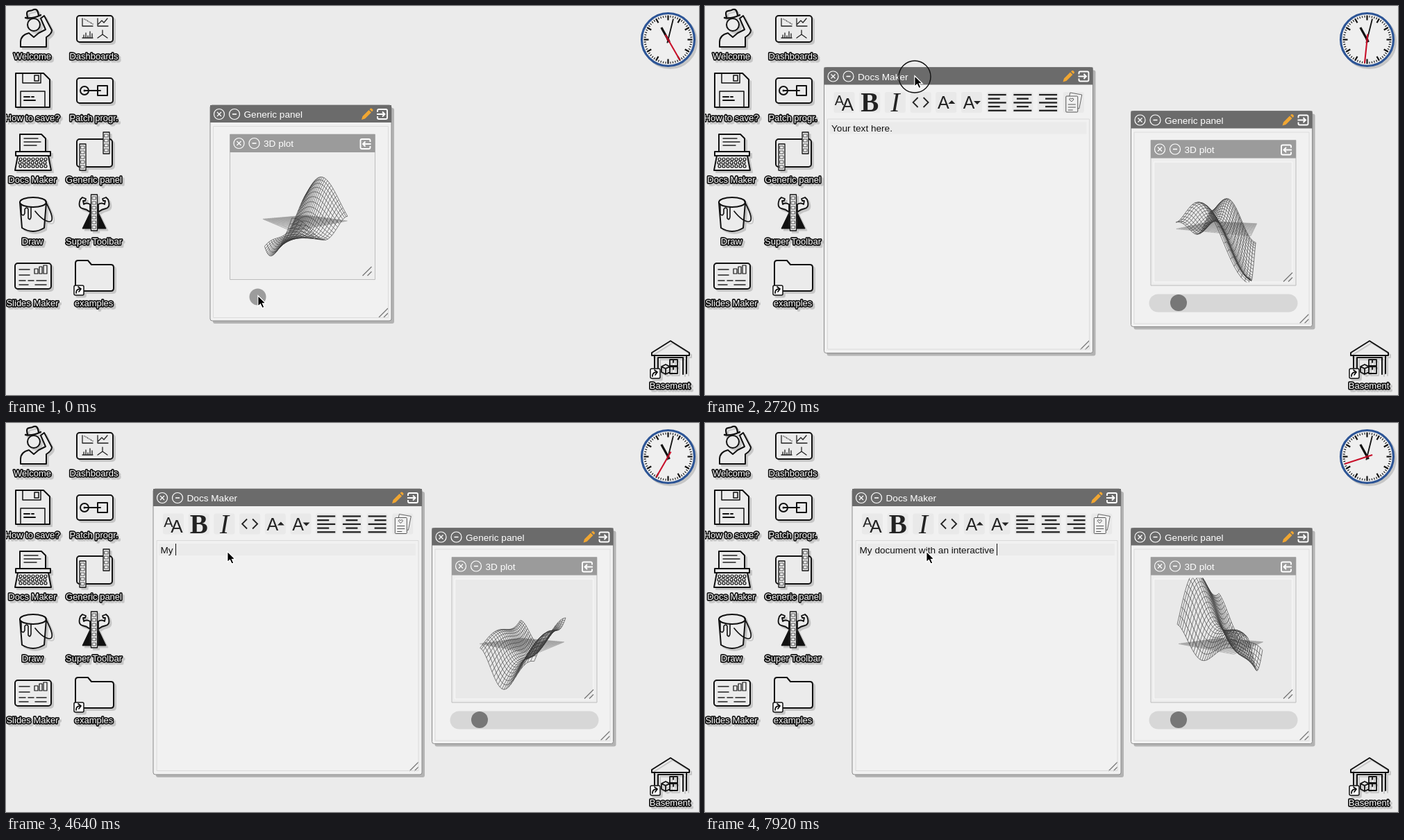
These frames come from a looping animation (998x561 px, 8000 ms). An HTML page with a canvas:

```html
<!DOCTYPE html>
<html>
<head>
<meta charset="utf-8">
<style>
html, body { margin: 0; height: 100%; overflow: hidden; background: #ebebeb; }
canvas { display: block; }
</style>
</head>
<body>
<canvas id="stage" width="998" height="561"></canvas>
<script>
const W = 998, H = 561, LOOP = 8000, STEP = 80;
const SANS = '"Liberation Sans", Arial, sans-serif', SERIF = '"Liberation Serif", Times, serif';
const ctx = document.getElementById('stage').getContext('2d');

// ---------- helpers ----------
function line(c, d, color = '#111', width = 2, fill) {
  const p = new Path2D(d);
  if (fill) { c.fillStyle = fill; c.fill(p); }
  c.strokeStyle = color;
  c.lineWidth = width;
  if (width) c.stroke(p);
}
function box(c, x, y, w, h, r, fill, stroke, width = 1) {
  c.beginPath();
  c.roundRect(x, y, w, h, r);
  if (fill) { c.fillStyle = fill; c.fill(); }
  if (stroke) { c.strokeStyle = stroke; c.lineWidth = width; c.stroke(); }
}
function disc(c, x, y, r, fill, stroke, width = 1) {
  c.beginPath();
  c.arc(x, y, r, 0, 7);
  if (fill) { c.fillStyle = fill; c.fill(); }
  if (stroke) { c.strokeStyle = stroke; c.lineWidth = width; c.stroke(); }
}
function text(c, s, x, y, color = '#111', font = '13.6px ' + SANS, align = 'left') {
  c.font = font;
  c.textAlign = align;
  c.fillStyle = color;
  c.fillText(s, x, y);
}
// Values at time t from rows of [time, ...values]
function track(rows, t, ease = k => k) {
  let i = 0;
  while (i < rows.length - 2 && t >= rows[i + 1][0]) i++;
  const a = rows[i], b = rows[i + 1];
  const k = ease(Math.min(1, Math.max(0, (t - a[0]) / (b[0] - a[0]))));
  return a.slice(1).map((v, j) => v + (b[j + 1] - v) * k);
}
const smooth = k => k * k * (3 - 2 * k);

// ---------- desktop ----------
function label(c, s, x, y) {
  c.font = '13px ' + SANS;
  c.textAlign = 'center';
  c.strokeStyle = '#111';
  c.lineWidth = 3.4;
  c.strokeText(s, x, y);
  c.fillStyle = '#fff';
  c.fillText(s, x, y);
}
function badge(c, x, y) {
  box(c, x, y, 14, 14, 2, '#fff', '#111', 1.5);
  line(c, `M${x + 3} ${y + 11}Q${x + 3} ${y + 5} ${x + 9} ${y + 5}M${x + 6} ${y + 2}L${x + 10} ${y + 5} ${x + 7} ${y + 9}`, '#111', 1.8);
}
function strip(c, x, y, n) {
  box(c, x, y, 9, n * 7 + 3, 0, '#eee', '#111', 1.3);
  for (let i = 0; i < n; i++) box(c, x + 2, y + 3 + i * 7, 5, 4, 0, null, '#555', 1);
}
function drawIcons(c) {
  const bg = '#ebebeb';
  c.lineJoin = c.lineCap = 'round';
  // Welcome
  line(c, 'M21 59V52Q21 42 33 39L40 45 47 39 57 34 50 18 55 14 66 35Q66 40 58 45V59Z', '#111', 2, bg);
  disc(c, 40, 27, 9, bg, '#111', 2);
  line(c, 'M28 17Q38 19 50 13M31 16C28 5 33 8 38 6C44 3 46 6 47 14', '#111', 2.3);
  // Floppy disk
  line(c, 'M14 97H54L63 106V146H14Z', '#111', 2, bg);
  line(c, 'M24 97V111H50V97M41 100H47V108H41ZM21 146V123H56V146', '#111', 1.5);
  line(c, 'M26 131H34M37 131H40M26 136H42', '#111', 2);
  // Typewriter
  line(c, 'M20 210V185H51L57 191V210Z', '#111', 2, bg);
  line(c, 'M26 191H46M26 196H50M26 201H44', '#222', 1.4);
  line(c, 'M14 210H64V216H14ZM17 216L13 237H65L61 216Z', '#111', 2, bg);
  for (let r = 0; r < 3; r++)
    for (let i = 0; i < 7; i++) disc(c, 21 + i * 6 - (r % 2), 221 + r * 5, 2, null, '#111', 1.2);
  // Bucket
  line(c, 'M20 283L23 320Q39 330 55 320L58 283Z', '#111', 2, bg);
  c.beginPath();
  c.ellipse(39, 283, 19, 7, 0, 0, 7);
  c.fill();
  c.stroke();
  line(c, 'M22 286V300Q25 304 27 299V293Q30 289 32 293V306Q35 310 36 304V290', '#111', 1.6);
  line(c, 'M57 282Q72 310 63 311Q54 311 42 296', '#111', 1.7);
  // Slides
  box(c, 13, 371, 52, 37, 4, bg, '#111', 2);
  line(c, 'M19 380H34M19 388H34M19 396H28M32 396H40M44 396H58M19 402H32M42 402H58', '#222', 1.5);
  line(c, 'M41 386V379H46V386ZM48 386V376H52V386ZM54 386V374H59V386Z', '#111', 1.2);
  // Dashboards
  box(c, 102, 14, 52, 38, 4, bg, '#111', 2);
  line(c, 'M110 18V29H125M132 18V29H147M133 26L138 21 141 24 146 18M110 46H125M112 46V42M115 46V39M118 46V43M121 46V37M124 46V40M139 35V41L132 46M139 41L146 46', '#222', 1.3);
  for (let i = 0; i < 8; i++) disc(c, 113 + (i * 5) % 13, 19 + (i * 3) % 8, .7, '#222');
  // Patch
  box(c, 102, 104, 52, 36, 4, bg, '#111', 2);
  disc(c, 113, 122, 6, null, '#111', 2);
  disc(c, 113, 122, 1.5, '#111');
  line(c, 'M113 122H136M132 115H146V129H132Z', '#111', 2);
  // Generic panel
  box(c, 102, 192, 51, 40, 4, bg, '#111', 2);
  strip(c, 140, 182, 4);
  strip(c, 106, 199, 5);
  // Super Toolbar
  line(c, 'M121 298L110 321H122ZM133 298L144 321H132Z', '#111', 1, '#111');
  line(c, 'M121 297Q116 293 110 292Q103 290 107 279L110 276 115 278 114 281H111L112 286Q116 283 121 286Z', '#111', 1.8, bg);
  line(c, 'M133 297Q138 293 144 292Q151 290 147 279L144 276 139 278 140 281H143L142 286Q138 283 133 286Z', '#111', 1.8, bg);
  strip(c, 122.5, 272, 7);
  // Folder
  line(c, 'M100 410V371Q100 367 104 367H118L123 373H151Q155 373 155 377V407Q155 411 151 411H102Z', '#111', 2, bg);
  badge(c, 98, 403);
  // Basement
  line(c, 'M930 500L957 483 984 500V504H930ZM934 504V530M980 504V530M939 531V507H975V531', '#111', 2);
  line(c, 'M956 510H967V519H956ZM956 520H967V530H956ZM944 520L950 517 956 520V528L950 531 944 528ZM944 520L950 523 956 520M950 523V531M961 510V514M961 520V524', '#111', 1.8);
  badge(c, 928, 523);
  const names = [['Welcome', 'Dashboards'], ['How to save?', 'Patch progr.'], ['Docs Maker', 'Generic panel'], ['Draw', 'Super Toolbar'], ['Slides Maker', 'examples']];
  names.forEach((row, r) => row.forEach((s, i) => label(c, s, 38 + i * 88.5, 77 + r * 89)));
  label(c, 'Basement', 956, 552);
  // Clock face
  disc(c, 953.5, 48.5, 38, '#efefef', '#2d5596', 3.2);
  c.lineCap = 'butt';
  for (let i = 0; i < 60; i++) {
    const big = i % 5 === 0;
    hand(c, i * 6, big ? 28 : 32, 35, big ? 2.2 : 1.1, '#111');
  }
  hand(c, 331, -4, 20, 3.2, '#111');
  hand(c, 14, -5, 31, 1.8, '#111');
}
function hand(c, deg, from, to, width, color) {
  const a = deg * Math.PI / 180, s = Math.sin(a), k = -Math.cos(a);
  c.beginPath();
  c.moveTo(953.5 + s * from, 48.5 + k * from);
  c.lineTo(953.5 + s * to, 48.5 + k * to);
  c.strokeStyle = color;
  c.lineWidth = width;
  c.stroke();
}
const icons = document.createElement('canvas');
icons.width = W;
icons.height = H;
drawIcons(icons.getContext('2d'));

function drawDesktop(t) {
  ctx.fillStyle = '#ebebeb';
  ctx.fillRect(0, 0, W, H);
  ctx.save();
  ctx.shadowColor = '#c6c6c6';
  ctx.shadowOffsetX = ctx.shadowOffsetY = 3;
  ctx.drawImage(icons, 0, 0);
  ctx.restore();
  hand(ctx, Math.floor(25.3 + 2.15 * t) * 6, -8, 34, 2.1, '#c8102a');
  disc(ctx, 953.5, 48.5, 2, '#a00c20');
}

// ---------- windows ----------
function titleBar(x, y, w, h, color, title) {
  ctx.fillStyle = color;
  ctx.fillRect(x, y, w, h);
  const cy = y + 13;
  disc(ctx, x + 13, cy, 7.5, null, '#fff', 1.2);
  disc(ctx, x + 35, cy, 7.5, null, '#fff', 1.2);
  line(ctx, `M${x + 10} ${cy - 3}l6 6m0 -6l-6 6`, '#fff', 1.2);
  line(ctx, `M${x + 32} ${cy}h6`, '#fff', 1.6);
  text(ctx, title, x + 48.5, cy + 5, '#fff');
}
function portIcon(x, y, dir) {
  ctx.save();
  ctx.translate(x, y);
  ctx.scale(dir, 1);
  line(ctx, 'M-7 -3V-5Q-7 -7 -5 -7H5Q7 -7 7 -5V5Q7 7 5 7H-5Q-7 7 -7 5V3', '#fff', 1.9);
  line(ctx, 'M-8 0H3M0 -3.5L3.5 0 0 3.5', '#fff', 1.9);
  ctx.restore();
}
function pencil(x, y) {
  line(ctx, `M${x - 8} ${y + 8}l1.5 -5 9 -9 3.5 3.5 -9 9zM${x + 3.5} ${y - 7}l1.5 -1.2q1 -.6 2 .3l1.2 1.2q.8 1 0 2l-1.2 1.2z`, '#f0a632', 0, '#f0a632');
}
function grip(x, y) {
  line(ctx, `M${x - 18} ${y - 5}l13 -13M${x - 11} ${y - 5}l6 -6`, '#777', 1.3);
}
function windowFrame(x, y, w, h, title) {
  box(ctx, x + 4, y + 4, w, h, 3, '#b3b3b3');
  box(ctx, x, y, w, h, 3, '#f1f1f1', '#8a8a8a');
  titleBar(x, y, w, 25, '#6b6b6b', title);
  pencil(x + w - 35, y + 13);
  portIcon(x + w - 13, y + 13, 1);
  grip(x + w, y + h);
}

// ---------- surface plot ----------
// time, offset, cos u, sin u, u, cos v, sin v, v, twist
const SHAPE = [
  [0, -.1, -.3, 0, -.08, .1, 0, .1, -1.25],
  [1.76, .02, -.1, .1, .57, .33, .2, .36, .25],
  [2.72, -.15, -.35, 0, .15, .5, .2, .6, 0],
  [3.84, -.12, -.5, 0, 0, .27, .1, .48, 0],
  [5.44, -.1, -.5, 0, 0, -.18, -.46, .54, 0],
  [6.64, -.1, -.46, -.1, -.05, -.32, .4, .42, -.3],
  [7.92, .5, -.33, 0, .36, .23, .5, -.32, 1.05]
];
function drawPlot(cx, cy, t) {
  const [o, a, b, l, c, d, e, p] = track(SHAPE, t);
  const { sin, cos, PI } = Math;
  const turn = (352 - 54.8 * t) * PI / 180, tilt = .157, N = 24;
  const wave = (u, v) => o + a * cos(PI * u) + b * sin(PI * u) + l * u +
    c * cos(3 * v) + d * sin(3 * v) + e * v + p * u * cos(1.2 * (v + .4));
  const point = (u, v, z) => {
    const x = u * sin(turn - PI / 4) + v * sin(turn + PI / 4);
    const y = u * cos(turn - PI / 4) + v * cos(turn + PI / 4);
    const s = 140 / (3.24 - y * cos(tilt) - z * sin(tilt));
    return [cx + s * x, cy - s * (z * cos(tilt) - y * sin(tilt))];
  };
  const mesh = (fn, color, width) => {
    ctx.beginPath();
    for (let i = 0; i <= N; i++)
      for (const flip of [0, 1])
        for (let j = 0; j <= N; j++) {
          const q = i / N * 2 - 1, r = j / N * 2 - 1, u = flip ? r : q, v = flip ? q : r;
          ctx[j ? 'lineTo' : 'moveTo'](...point(u, v, fn(u, v)));
        }
    ctx.strokeStyle = color;
    ctx.lineWidth = width;
    ctx.stroke();
  };
  mesh(() => 0, '#9b9b9b', .6);
  mesh(wave, '#3c3c3c', .65);
}

function drawPanel(t) {
  const [x, y] = track([[0, 294, 143], [.56, 294, 143], [1.2, 613.5, 151.5]], t, smooth);
  const settled = track([[0, 0], [.4, 1]], t)[0];
  windowFrame(x, y, 261, 311, 'Generic panel');
  box(ctx, x + 4.5, y + 30.5, 252, 276, 0, null, '#dcdcdc');
  const px = x + 28.5, py = y + 42;
  box(ctx, px, py, 209, 209.5, 0, '#eee', '#bcbcbc');
  titleBar(px, py, 209, 26, '#9b9b9b', '3D plot');
  portIcon(px + 195, py + 14, -1);
  ctx.save();
  ctx.globalAlpha = settled;
  box(ctx, px + 4.5, py + 31.5, 199, 173, 0, '#e9e9e9', '#f8f8f8');
  box(ctx, x + 26, y + 264, 214, 26, 13, '#d7d7d7');
  ctx.globalAlpha = .7 + .3 * settled;
  disc(ctx, x + 68.5, y + 276.5, 12, '#777');
  ctx.restore();
  ctx.save();
  ctx.beginPath();
  ctx.rect(px + 4, py + 30, 201, 175);
  ctx.clip();
  drawPlot(x + 133, y + 165.5, t);
  ctx.restore();
  grip(px + 209, py + 209);
}

// ---------- document editor ----------
function drawToolbar(x, y) {
  for (let i = 0; i < 10; i++) box(ctx, x + i * 36.7 - 15, y - 15, 30, 30, 3, '#e9e9e9');
  const at = i => x + i * 36.7;
  text(ctx, 'A', x - 7, y + 4, '#222', '20px ' + SANS, 'center');
  text(ctx, 'A', x + 5, y + 12, '#222', '26px ' + SANS, 'center');
  text(ctx, 'B', at(1), y + 13, '#222', 'bold 39px ' + SERIF, 'center');
  text(ctx, 'I', at(2), y + 13, '#222', 'italic 39px ' + SERIF, 'center');
  line(ctx, `M${at(3) - 4} ${y - 7}l-7 7 7 7m8 -14l7 7 -7 7`, '#222', 1.8);
  for (const i of [4, 5]) {
    text(ctx, 'A', at(i) - 4, y + 9, '#222', '25px ' + SANS, 'center');
    const k = i === 4 ? -1 : 1;
    line(ctx, `M${at(i) + 3} ${y - 2 * k}h10l-5 ${5 * k}z`, '#222', 0, '#222');
  }
  for (let i = 6; i < 9; i++)
    for (let r = 0; r < 5; r++) {
      const w = r % 2 ? 17 : 26, left = at(i) - 13 + (26 - w) * (i - 6) / 2;
      line(ctx, `M${left} ${y - 11 + r * 5.7}h${w}`, '#222', 2.3);
    }
  const q = at(9);
  line(ctx, `M${q - 5} ${y - 14}l17 3 -4 20 -17 -3z`, '#666', 1, '#f1f1f1');
  box(ctx, q - 11, y - 9, 17, 23, 1, '#f1f1f1', '#555', 1);
  line(ctx, `M${q - 8} ${y + 3}h11m-11 4h11m-11 4h7M${q - 3} ${y - 1}l-3 -3q0 -3 3 -1q3 -2 3 1z`, '#555', 1);
}
function drawDocs(t) {
  if (t < 2.16) return;
  const [x, y] = track([[2.8, 171.5, 88.5], [3.28, 212, 95]], t, smooth);
  windowFrame(x, y, 387, 412, 'Docs Maker');
  drawToolbar(x + 29, y + 50.5);
  box(ctx, x + 5, y + 74.5, 377, 332, 0, null, '#dadada');
  ctx.fillStyle = '#ebebeb';
  ctx.fillRect(x + 8, y + 79, 370, 17);
  const typed = track([[4.3, 0], [5.44, 10.2], [6.16, 19.2], [6.72, 19.3], [7.92, 32]], t)[0];
  const s = t < 4.3 ? 'Your text here.' : 'My document with an interactive '.slice(0, Math.floor(typed + .01));
  text(ctx, s, x + 10.5, y + 92.5);
  const caret = t > 3.7 && !(t > 6.5 && t < 6.72);
  if (caret) {
    const at = t < 4.3 ? 'Your te' : s;
    ctx.fillStyle = '#111';
    ctx.fillRect(Math.round(x + 10.5 + ctx.measureText(at).width), y + 79, 1, 17);
  }
}

// ---------- pointer ----------
const POINTER = [
  [0, 363, 418], [.08, 363, 418], [.46, 385, 156], [.56, 385, 156], [1.2, 704.5, 164.5], [1.3, 704.5, 164.5],
  [1.76, 76, 210], [1.92, 46, 213], [2.16, 46, 213], [2.6, 302, 101], [2.8, 302, 101], [3.28, 342.5, 107.5],
  [3.36, 342.5, 107.5], [3.68, 270, 181], [4, 270, 181], [4.3, 319, 185.5]
];
const PRESSES = [[.48, 1.24], [2, 2.12], [2.64, 3.32]];
function drawPointer(t) {
  const [x, y] = track(POINTER, t, smooth);
  if (PRESSES.some(([a, b]) => t >= a && t < b)) disc(ctx, x, y + 1, 23, null, '#111', 1.4);
  line(ctx, `M${x} ${y}v15l3.5 -3.2 2.6 5.8 2.8 -1.2 -2.6 -5.6h4.7z`, '#fff', 1.4, '#000');
  line(ctx, `M${x + .6} ${y + 1.4}v12l3 -2.6 2.8 5.8 1.4 -.6 -2.6 -5.8h4z`, '#000', 0, '#000');
}

function frame(now) {
  const t = Math.floor(now % LOOP / STEP) * STEP / 1000;
  drawDesktop(t);
  drawPanel(t);
  drawDocs(t);
  drawPointer(t);
  requestAnimationFrame(frame);
}
requestAnimationFrame(frame);
</script>
</body>
</html>
```
